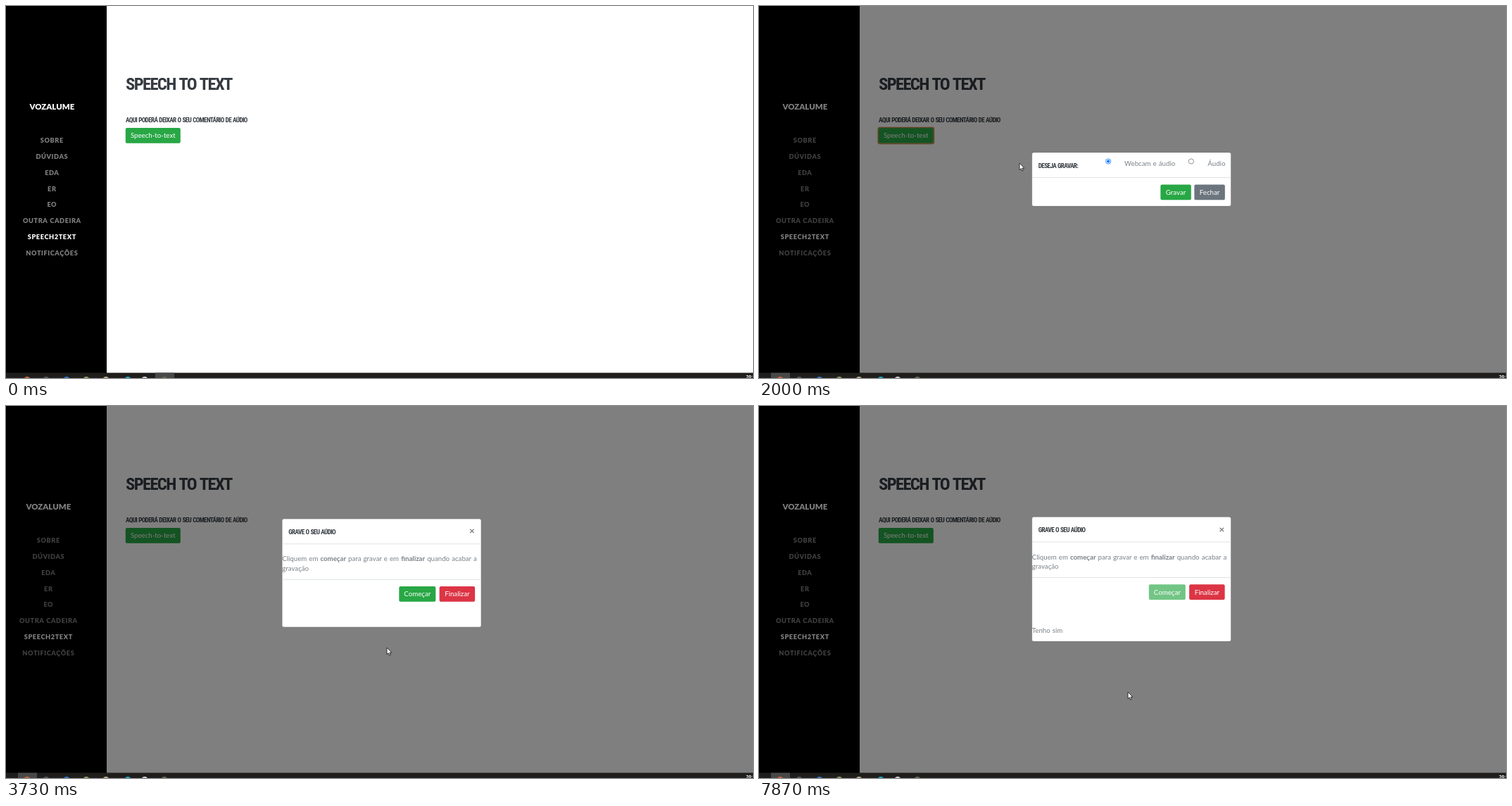
Animation of 1061 by 528 pixels, one loop 8000 ms. Source, as an HTML page:

```html
<!DOCTYPE html>
<html lang="pt">
<head>
<meta charset="utf-8">
<title>Speech to text</title>
<style>
  html, body { margin: 0; width: 100%; height: 100%; overflow: hidden; background: #fff; }
  svg { display: block; }
  text { font: 9.7px Lato, "Open Sans", sans-serif; word-spacing: .06em; fill: #7a8087; }
  .head { font: 700 9.15px "Roboto Condensed", Roboto, sans-serif; font-stretch: 75%; letter-spacing: -.067em; fill: #343a40; }
  .title { font-size: 24.6px; }
  .mid { text-anchor: middle; }
  .btn { fill: #fff; }
  .nav { font-weight: 900; font-size: 9.25px; letter-spacing: .55px; fill: #7f7f7f; }
  .on { fill: #fff; }
  .brand { font-weight: 900; font-size: 11.4px; fill: #fff; }
  .para { font-size: 9.68px; }
  .bold { font-weight: 700; }
  .close { font-weight: 700; font-size: 14px; fill: #7c7c7c; }
  .clock { font: 700 6.5px "Open Sans", sans-serif; fill: #fff; }
</style>
</head>
<body>
<svg id="stage" width="1061" height="528" viewBox="0 0 1061 528"></svg>
<script>
const LOOP = 8000, GREEN = '#28a745', RISE = 28.7;

const rect = (x, y, w, h, fill, more = '') =>
  `<rect x="${x}" y="${y}" width="${w}" height="${h}" fill="${fill}" ${more}/>`;
const text = (x, y, cls, str, more = '') => `<text x="${x}" y="${y}" class="${cls}" ${more}>${str}</text>`;
const button = (x, y, w, fill, label, id = '') => `<g id="${id}">` +
  rect(x, y, w, 21.8, fill, 'rx="2"') + text(x + w / 2, y + 14.3, 'mid btn', label) + '</g>';
const ring = (id, x, y, w) =>
  rect(x - .6, y - .6, w + 1.2, 23, 'none', `id="${id}" rx="2.4" stroke="#c58a45" stroke-width="1.5"`);
const rule = y => rect(0, y, 282.5, 1, '#dee2e6');
const radio = (id, x) => `<circle cx="${x}" cy="12.5" r="3.6" fill="#fff" id="${id}o"/>` +
  `<circle cx="${x}" cy="12.5" r="2.1" fill="#0075ff" id="${id}"/>`;
const panel = (id, h) =>
  rect(0, 0, 282.5, h, '#fff', `id="${id}" rx="2.5" stroke="#000" stroke-opacity=".2" stroke-width=".6"`);

const menu = ['SOBRE', 'DÚVIDAS', 'EDA', 'ER', 'EO', 'OUTRA CADEIRA', 'SPEECH2TEXT', 'NOTIFICAÇÕES'];
const icons = [[30, '#c8643c'], [57, '#55565a'], [86, '#2f78c4'], [114, '#8c9a68'],
  [142, '#b9ab8c'], [173, '#1fa3c9'], [197, '#d0d0d0'], [225, '#5b6b50']];

stage.innerHTML =
  rect(0, 0, 1061, 528, '#fff') + rect(0, 0, 143, 521, '#000') +
  '<g id="side">' + text(0, 147.2, 'mid brand', 'VOZALUME') +
  menu.map((m, i) => text(0, 194.2 + i * 22.78, 'mid nav' + (i === 6 ? ' on' : ''), m)).join('') + '</g>' +
  text(170, 119, 'head title', 'SPEECH TO TEXT') +
  text(170, 165.4, 'head', 'AQUI PODERÁ DEIXAR O SEU COMENTÁRIO DE AÚDIO') +
  button(169.8, 173, 78, GREEN, 'Speech-to-text') + ring('pageRing', 169.8, 173, 78) +
  rect(0, 0, 1061, 521, '#000', 'id="shade"') +

  '<g id="choose">' + panel('', 76) + text(9, 21.5, 'head', 'DESEJA GRAVAR:') +
  radio('webcam', 108.3) + text(131.3, 19.3, '', 'Webcam e áudio') +
  radio('audio', 226) + text(249.5, 19.3, '', 'Áudio') + rule(35) +
  button(182.5, 45.5, 43.5, GREEN, 'Gravar') + ring('saveRing', 182.5, 45.5, 43.5) +
  button(230.5, 45.5, 43.5, '#6c757d', 'Fechar') + '</g>' +

  '<g id="record">' + panel('recordBox', 153.5) + text(9, 21.5, 'head', 'GRAVE O SEU AÚDIO') +
  text(269.4, 22, 'mid close', '×') + rule(35) +
  text(0, 60, 'para', 'Cliquem em <tspan class="bold">começar</tspan> para gravar e em ' +
    '<tspan class="bold">finalizar</tspan> quando acabar a') +
  text(0, 73.6, 'para', 'gravação') + rule(85.5) +
  button(166, 95.7, 52, GREEN, 'Começar', 'start') + button(223.3, 95.7, 50.5, '#dc3545', 'Finalizar') +
  text(0, 164.3, '', '', 'id="speech"') + '</g>' +

  rect(0, 520.6, 1061, 8, '#1f1e1d') + rect(0, 520.6, 27, 8, '#484848', 'id="task"') +
  icons.map(([x, c]) => `<circle cx="${x}" cy="531" r="5" fill="${c}"/>`).join('') +
  text(1051, 528.8, 'clock', '20:') +
  '<g id="cursor" fill="#fff" stroke="#111" stroke-width=".8" stroke-linejoin="round">' +
  '<path id="arrow" d="M0 0V9.6L2.2 7.6 3.8 11 5.3 10.3 3.8 7H6.8Z"/>' +
  '<path id="hand" d="M-1 1a1 1 0 0 1 2 0V4.5l3.5 .8q1.3 .3 1.2 1.7L5 12.5H0L-3.4 8q-.2-1.5 1.4-1L-1 7.8Z"/></g>';

// time, x, y of the pointer tip
const path = [
  [290, 820, 472], [520, 557, 390], [750, 553, 387], [1050, 146, 184], [1210, 190, 182],
  [1370, 192, 182], [1540, 197, 183], [1590, 198, 184], [1710, 238, 238], [2140, 433, 216],
  [2300, 500, 270], [2420, 600, 286], [2500, 637, 252], [2590, 614, 220], [2760, 614, 220],
  [3250, 597, 266], [3400, 598, 268], [3500, 598, 268], [3730, 541, 343], [4150, 541, 343],
  [4430, 578, 272], [4640, 578, 272], [4860, 524, 388], [4930, 528, 396], [5010, 528, 404],
  [5620, 527, 404], [5930, 526, 405], [6010, 524, 406], [LOOP, 524, 406]];
const words = [[7090, 'te'], [7170, 'ten'], [7320, 'tens'], [7500, 'tenho'], [7560, 'tenho sim'], [7790, 'Tenho sim']];

const clamp = v => Math.min(1, Math.max(0, v));
const between = (t, a, b) => t >= a && t < b;
const show = (el, on) => el.setAttribute('visibility', on ? 'visible' : 'hidden');
const move = (el, x, y) => el.setAttribute('transform', `translate(${x} ${y})`);
const slide = (t, start) => RISE * (1 - clamp((t - start) / 300)) ** 1.7;
const fade = (t, start) => clamp((t - start) / 150);

function pointer(t) {
  const i = Math.max(1, path.findIndex(k => k[0] > t));
  const [t0, x0, y0] = path[i - 1], [t1, x1, y1] = path[i];
  const p = clamp((t - t0) / (t1 - t0));
  return [x0 + (x1 - x0) * p, y0 + (y1 - y0) * p];
}

function draw(t) {
  const swap = between(t, 3380, 3870), left = swap ? 392.3 : 387.8;
  move(side, swap || between(t, 1597, 1840) ? 60.3 : 65.3, 0);
  shade.setAttribute('opacity', .5 * fade(t, 1594));
  show(pageRing, between(t, 1580, 2700));
  task.setAttribute('x', t < 1470 ? 212 : 17);

  move(choose, left, 208 - slide(t, 1680) - (RISE - slide(t, 3460)));
  choose.setAttribute('opacity', fade(t, 1680) * (1 - fade(t, 3460)));
  const picked = t >= 2760;
  for (const [dot, outer, on] of [[webcam, webcamo, !picked], [audio, audioo, picked]]) {
    dot.setAttribute('opacity', +on);
    outer.setAttribute('stroke', on ? '#0075ff' : '#767676');
    outer.setAttribute('stroke-width', .8);
  }
  saveRing.setAttribute('opacity', +(t >= 3320));

  const said = words.filter(w => w[0] <= t).pop();
  move(record, left, (said ? 157.5 : 169) - slide(t, 3580));
  record.setAttribute('opacity', fade(t, 3580));
  recordBox.setAttribute('height', said ? 176.5 : 153.5);
  start.setAttribute('opacity', t < 4570 ? 1 : .65);
  speech.textContent = said ? said[1] : '';

  const pressing = between(t, 3230, 3530) || between(t, 4390, 4680);
  show(arrow, t >= 290 && !pressing);
  show(hand, pressing);
  move(cursor, ...pointer(t));
}

const origin = performance.now();
function tick() {
  draw((performance.now() - origin) % LOOP);
  requestAnimationFrame(tick);
}
tick();
</script>
</body>
</html>
```
